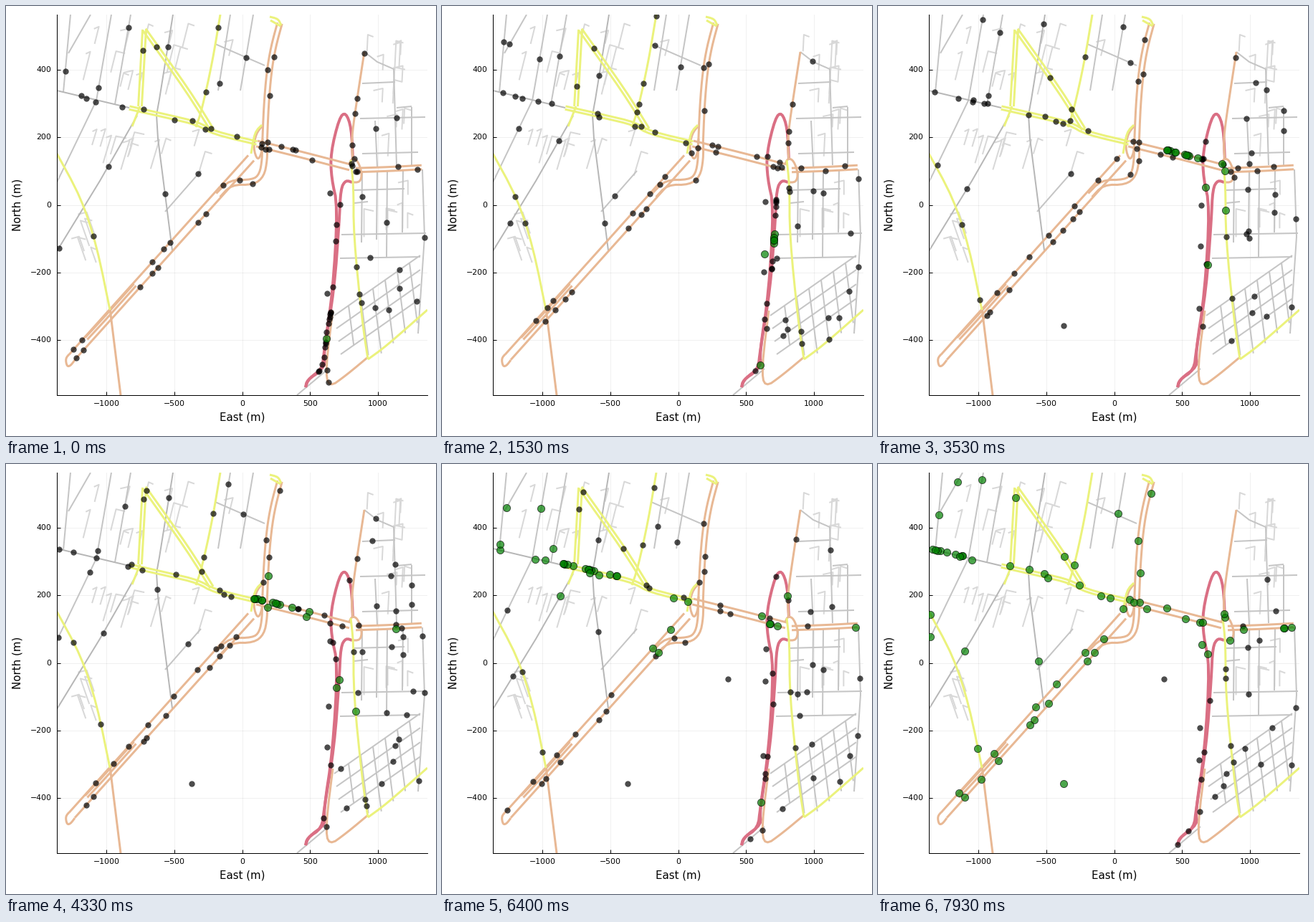
A matplotlib script that plays this animation: 600x600 px, repeating every 8000 ms.

```python
import random

import matplotlib.pyplot as plt
import numpy as np
from matplotlib.animation import FuncAnimation
from matplotlib.collections import LineCollection

FPS, FRAMES = 15, 120
LEFT, RIGHT, TOP, BOTTOM = 71, 588, 12, 543.3
RED, ORANGE, YELLOW = "#da6f84", "#e8b894", "#ebf27c"
DARK, MID, LIGHT = "#b7b7b7", "#c5c5c5", "#d8d8d8"
rng = random.Random(7)


def smooth(pts, rounds=2):
    """Round the corners of a polyline by cutting them."""
    p = np.array(pts, float)
    for _ in range(rounds):
        q = 0.75 * p[:-1] + 0.25 * p[1:]
        r = 0.25 * p[:-1] + 0.75 * p[1:]
        mid = np.stack([q, r], axis=1).reshape(-1, 2)
        p = np.vstack([p[:1], mid[1:-1], p[-1:]])
    return p


def lanes(pts, gap):
    """The two carriageways of a road, each on the right of its travel."""
    def right(line):
        p = np.array(line, float)
        d = np.gradient(p, axis=0)
        d /= np.hypot(*d.T)[:, None]
        return [tuple(q) for q in p + gap * np.c_[-d[:, 1], d[:, 0]]]
    return right(pts), right(pts[::-1])


class Path:
    def __init__(self, pts):
        self.p = np.array(pts, float)
        step = np.hypot(*np.diff(self.p, axis=0).T)
        self.s = np.r_[0, np.cumsum(step)]
        self.length = self.s[-1]

    def at(self, s):
        return [np.interp(s, self.s, self.p[:, k]) for k in (0, 1)]

    def locate(self, q):
        s = np.linspace(0, self.length, 800)
        x, y = self.at(s)
        return s[np.hypot(x - q[0], y - q[1]).argmin()]


# ---- main roads, in stage pixels
diag_e, diag_w = lanes([(92, 490), (342, 212)], 5.4)
fork_e, fork_w = lanes([(112, 464), (138, 436), (180, 389)], 2)
bridge_e, bridge_w = lanes([(350, 192), (415, 208), (480, 225)], 4)
trunk_e, trunk_w = lanes([(172, 142), (230, 155), (268, 164), (290, 177),
                          (350, 191)], 2.2)
north_up, north_down = lanes([(361, 190), (363, 140), (367, 92), (373, 57),
                              (382, 24)], 3.3)
ramp_out, ramp_in = lanes([(296, 264), (313, 246), (345, 246), (357, 236),
                           (361, 214), (361, 190)], 3.6)
east_e, east_w = lanes([(488, 229), (535, 227.5), (580, 225)], 2.8)
tri_l = [(193, 33), (187, 140), (176, 168)]
tri_r = [(193, 33), (255, 120), (287, 172)]
cross = [(299, 12), (288, 78), (273, 146), (265, 169)]
west_y = [(71, 206), (105, 268), (127, 336), (145, 424)]
east_y = [(481, 215), (485, 250), (485, 320), (497, 440), (505, 493)]
slip = [(500, 64), (486, 155), (482, 190), (484, 215)]
south = [(456, 425), (446, 505), (450, 533), (475, 515), (505, 490)]
turn = [(88, 486), (83, 492), (85, 503), (90, 502), (96, 494)]
ring = [(483, 246), (494, 246), (497, 234), (491, 216), (483, 212), (479, 220)]
red_n = [(418, 532), (420, 522), (441, 508), (444, 480), (458, 395), (465, 300),
         (467, 255), (474, 243), (483, 246)]
red_s = [(484, 215), (482, 170), (474, 148), (465, 156), (453, 205), (454, 240),
         (463, 280), (456, 400), (443, 485), (446, 503), (422, 520), (418, 532)]

roads = []


def draw(color, width, *lines):
    roads.extend((smooth(line), color, width) for line in lines)


# ---- side streets
streets = []


def lay(color, *lines):
    streets.extend((line, color, 2) for line in lines)


def hooks(count, x0, x1, y0, y1, lean):
    """Small dead ends with a bent tip."""
    for _ in range(count):
        x, y = rng.uniform(x0, x1), rng.uniform(y0, y1)
        h, arm = rng.uniform(16, 42), rng.choice((-1, 1)) * rng.uniform(6, 15)
        foot = (x - lean * h, y + h)
        lay(LIGHT, [(x + arm, y + 3), (x, y), foot])


hooks(15, 95, 335, 20, 95, 0.25)
hooks(12, 95, 305, 165, 205, 0.3)
hooks(6, 92, 130, 285, 385, -0.35)
hooks(13, 503, 568, 36, 180, 0.05)
hooks(6, 495, 570, 235, 300, 0)
for top, foot, y in ((90, 80, 120), (118, 87, 66), (147, 126, 132), (174, 152, 137),
                     (313, 296, 118), (345, 327, 118)):
    lay(MID, [(top, 12), (foot, y)])
lay(MID, [(126, 132), (71, 246)], [(272, 230), (222, 287)], [(292, 53), (361, 83)],
    [(406, 543), (450, 506)])
lay(MID, [(500, 64), (518, 78), (541, 88), (545, 222)], [(515, 160), (518, 224)],
    [(566, 141), (566, 222)], [(581, 228), (584, 322), (575, 457)])
for x, y in ((497, 330), (518, 326), (532, 350), (554, 316)):
    lay(MID, [(x, 230), (x - 1, y)])
for y, x0, x1 in ((107, 497, 543), (141, 545, 566), (156, 494, 585), (205, 497, 575),
                  (256, 484, 556), (274, 486, 505), (318, 468, 586), (351, 466, 578)):
    lay(MID, [(x0, y + 1), (x1, y - 1)])
for k in range(4):
    x, y = 458 + 3 * k, 432 + 18 * k
    lay(MID, [(x, y), (578, y - 0.7 * (578 - x))])
for x in range(478, 568, 17):
    y, foot = 432 - 0.7 * (x - 458), 493 - 0.83 * abs(x - 502)
    lay(MID, [(x, y), (x + 0.13 * (foot - y), foot)])
lay(DARK, [(71, 118), (172, 142)], [(71, 342), (131, 244), (183, 153)],
    [(233, 12), (214, 130), (210, 152), (212, 185), (232, 341)])

draw(RED, 4, red_n, red_s)
draw(ORANGE, 3, diag_e, diag_w, fork_e, fork_w, turn, bridge_e, bridge_w, ring,
     east_e, east_w, ramp_out, ramp_in, north_up, north_down, slip, south,
     [(145, 422), (160, 543)],
     [(357, 168), (349, 178), (345, 198), (351, 216), (357, 205), (358, 185)])
draw(YELLOW, 3, trunk_e, trunk_w, *lanes(tri_l[:2], 2.4), *lanes(tri_r, 2.4),
     tri_l[1:], cross, west_y, east_y, [(505, 493), (530, 475), (588, 424)],
     [(357, 166), (347, 176), (342, 206)], [(368, 15), (380, 18), (384, 27)],
     [(369, 20), (383, 28)])

# ---- traffic: each car is a function from frame to place, or None when away
cars = []


def drive(path, dist):
    def place(f):
        s = dist(f)
        return path.at(s) if 0 < s < path.length else None
    cars.append(place)


def flow(path, seen, speed):
    """A steady stream with about so many cars in view."""
    reach = path.length + speed * FRAMES / FPS
    count = max(1, round(seen * reach / path.length))
    for i in range(count):
        s0 = path.length - (i + rng.random()) * reach / count
        drive(path, lambda f, s0=s0: s0 + speed * f / FPS)


def convoy(path, frames, points, lags):
    """Cars that follow one timed drive, each with its own lag in frames."""
    marks = [0] + [path.locate(p) for p in points] + [path.length + 1]
    for lag in lags:
        drive(path, lambda f, lag=lag: np.interp(f - lag, frames, marks))


out = [(71, 118)]
main = Path(smooth(red_n + ring + bridge_w + trunk_w + out))
convoy(main, [-12, 0, 23, 39, 53, 77, 96, 119],
       [(446, 463), (464, 312), (470, 219), (425, 206), (310, 182), (200, 148)],
       [0] + [rng.uniform(-6, 9) for _ in range(11)])
for line, seen in ((red_n + ring + bridge_w + diag_w, 6),
                   (east_w + bridge_w + trunk_w + out, 8),
                   (diag_e[:1] + [(280, 288)] + ramp_out + north_up, 8),
                   (out + trunk_e + bridge_e + east_e, 8),
                   (diag_e + bridge_e + east_e, 5),
                   (north_down + ramp_in + diag_w, 7),
                   (slip + red_s, 4), (bridge_e + red_s, 3),
                   (slip + east_y, 2), (east_y[::-1], 2), (south, 1),
                   (west_y, 2), (tri_l, 1), (tri_r, 2), (cross, 2),
                   ([(452, 245), (450, 334), (446, 480)], 3)):
    flow(Path(smooth(line)), seen, 75)
for line, color, _ in streets:
    path = Path(line[::rng.choice((-1, 1))])
    if color != LIGHT:
        flow(path, path.length / 170, 28)
for x, y, start, end in ((259, 446, 45, 120), (399, 300, 70, 120), (518, 324, 30, 62)):
    cars.append(lambda f, p=(x, y), a=start, b=end: p if a <= f < b else None)


# ---- the green mark spreads to the nearest cars, more readily westward
def wanted(f):
    return round(1 + 0.28 * f + 33 * (f / (FRAMES - 1)) ** 7)


def spread():
    marked, states = {0}, []
    for f in range(FRAMES):
        spots = {i: np.array(p) for i, p in enumerate(c(f) for c in cars) if p}
        green = [i for i in spots if i in marked]
        black = [i for i in spots if i not in marked]
        while black and green and len(green) < wanted(f):
            near = np.array([spots[i] for i in green])
            i = min(black, key=lambda k: np.hypot(*(near - spots[k]).T).min()
                    + 0.3 * spots[k][0])
            black.remove(i)
            green.append(i)
            marked.add(i)
        states.append([np.reshape([spots[i] for i in ids], (-1, 2))
                       for ids in (black, green)])
    return states


states = spread()

# ---- picture
plt.rcParams["font.family"] = "DejaVu Sans"
fig = plt.figure(figsize=(6, 6), dpi=100, facecolor="white")
ax = fig.add_axes([LEFT / 600, 1 - BOTTOM / 600, (RIGHT - LEFT) / 600,
                   (BOTTOM - TOP) / 600])
ax.set(xlim=(LEFT, RIGHT), ylim=(BOTTOM, TOP))
ax.spines[["top", "right"]].set_visible(False)
ax.spines[["left", "bottom"]].set_linewidth(0.72)

xs = {e: 329.6 + 0.1892 * e for e in range(-1000, 1001, 500)}
ys = {n: 277.6 - 0.4718 * n for n in range(-400, 401, 200)}
ax.set_xticks(list(xs.values()), [])
ax.set_yticks(list(ys.values()), [])
ax.tick_params(direction="in", length=3.6, width=0.72)
ax.set_axisbelow(True)
ax.grid(color="black", alpha=0.07, linewidth=0.6)
for e, x in xs.items():
    ax.text(x, 555, f"{e}".replace("-", "\u2212"), size=7.8, ha="center", va="center")
for n, y in ys.items():
    ax.text(63.5, y, f"{n}".replace("-", "\u2212"), size=7.8, ha="right", va="center")
ax.text(329.6, 574.5, "East (m)", size=10.8, ha="center", va="center")
ax.text(16.5, 277.6, "North (m)", size=10.8, ha="center", va="center", rotation=90)

lines = streets + roads
ax.add_collection(LineCollection([r[0] for r in lines], colors=[r[1] for r in lines],
                                 linewidths=[0.72 * r[2] for r in lines], zorder=2),
                  autolim=False)
plain = ax.scatter([], [], s=36, c="black", alpha=0.7, linewidths=0, zorder=3)
green = ax.scatter([], [], s=54, c="green", alpha=0.7, edgecolors="black",
                   linewidths=0.6, zorder=4)


def update(f):
    plain.set_offsets(states[f][0])
    green.set_offsets(states[f][1])
    return plain, green


anim = FuncAnimation(fig, update, frames=FRAMES, interval=8000 / FRAMES, repeat=True,
                     repeat_delay=0, blit=False)
plt.show()
```
